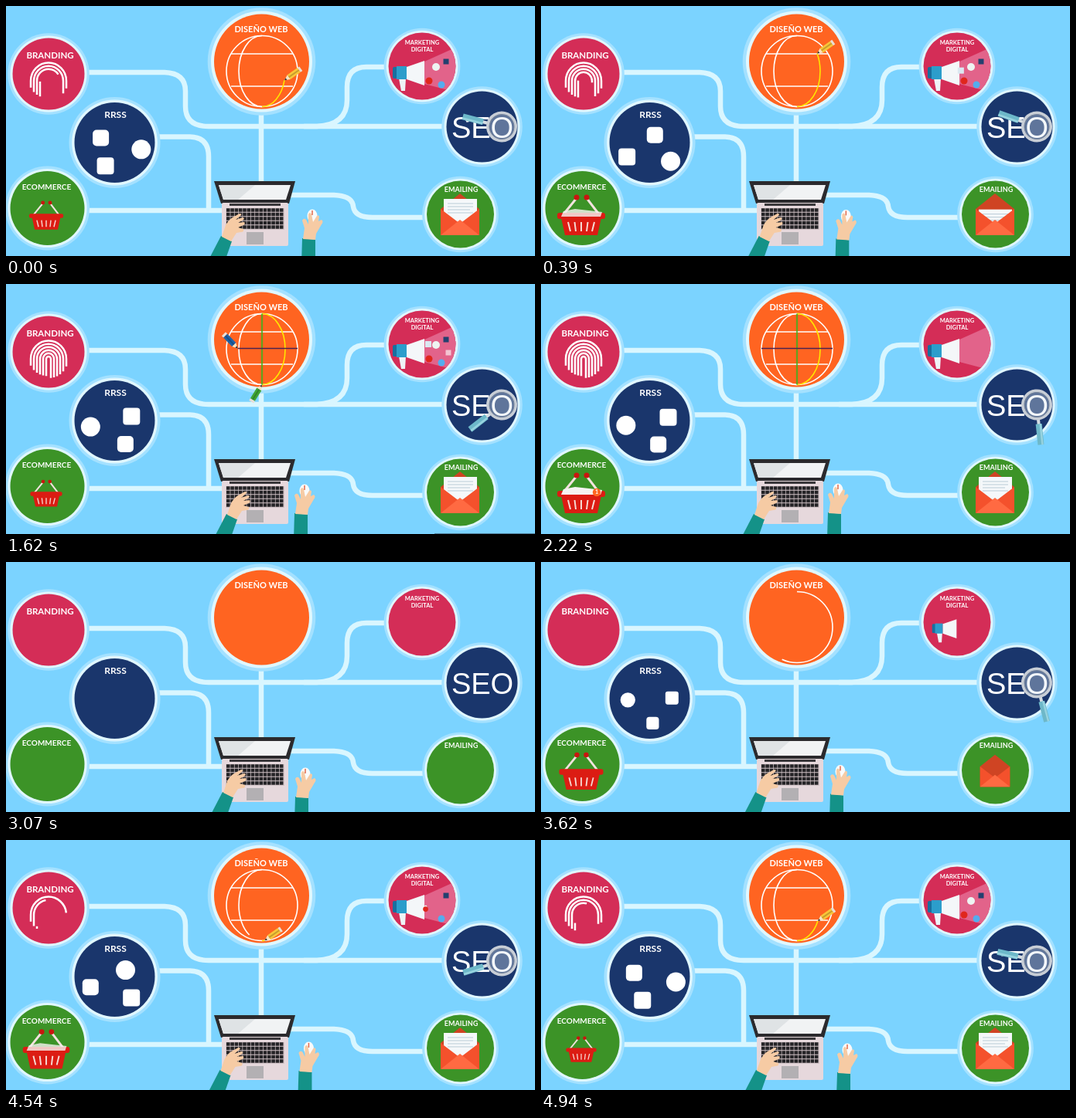
These frames come from a looping animation (684x324 px, 5040 ms). An HTML page:

```html
<!DOCTYPE html>
<html lang="es">
<head>
<meta charset="utf-8">
<style>
html, body { margin: 0; width: 100%; height: 100%; overflow: hidden; background: #7bd3ff }
svg { display: block; width: 684px; height: 324px }
.label { font: 700 11px Lato, "Open Sans", sans-serif; fill: #fff; text-anchor: middle }
.wire { fill: none; stroke: #d9f6ff; stroke-width: 6.5 }
.line { fill: none; stroke: #fff; stroke-width: 1.6 }
</style>
</head>
<body>
<svg viewBox="0 0 684 324">
  <defs>
    <clipPath id="beamClip"><circle cx="538" cy="78" r="43.5"/></clipPath>
    <clipPath id="mailClip"><rect x="550" y="225" width="75" height="71"/></clipPath>
  </defs>

  <g class="wire">
    <path d="M330 134V230M104 86H205Q232 87 232 110V130Q232 156 262 156H568"/>
    <path d="M385 156H402Q441 154 441 122V105Q441 79 466 79H492"/>
    <path d="M196 169.500H238Q262 170 262 195V265M103 265H282"/>
    <path d="M368 245H424Q448 246 449 260Q451 274 474 274H542"/>
  </g>
  <g id="discs"></g>

  <g class="label">
    <text x="57" y="68" style="font-size:11.500px">BRANDING</text>
    <text x="330" y="34">DISEÑO WEB</text>
    <text x="141.500" y="145" style="font-size:12px">RRSS</text>
    <text x="52.500" y="238" style="font-size:10px">ECOMMERCE</text>
    <text x="588.500" y="241" style="font-size:9px">EMAILING</text>
    <text x="538" y="50" style="font-size:7.500px">MARKETING</text>
    <text x="538" y="59" style="font-size:7.500px">DIGITAL</text>
    <text x="616" y="170.500" style="font:38px 'Liberation Sans',Arial,sans-serif">SEO</text>
  </g>

  <g id="print" class="line" style="stroke-width:2.500"></g>

  <g id="globe" class="line">
    <circle id="rim" cx="331" cy="84.500" r="46" pathLength="1" transform="rotate(-90 331 84.500)"/>
    <path id="upper" pathLength="1" d="M291 62H371"/>
    <path id="lower" pathLength="1" d="M291 104H371"/>
    <path id="west" pathLength="1" d="M331 38.500A30 46 0 0 0 331 130.500"/>
  </g>
  <g id="pens"></g>

  <g id="social" fill="#fff">
    <circle r="12.500"/>
    <rect x="-11" y="-11" width="22" height="22" rx="4"/>
    <rect x="-10.500" y="-10.500" width="21" height="21" rx="5"/>
  </g>

  <g id="basket">
    <path d="M-23 -2L-6 -23M23 -2L7 -23" stroke="#f3e3de" stroke-width="3"/>
    <circle cx="-6" cy="-24" r="3.500" fill="#c9160f"/>
    <circle cx="7" cy="-24" r="3.500" fill="#c9160f"/>
    <path d="M-26 2H26L21 25H-21Z" fill="#dc1c13"/>
    <path d="M-17 8L-14 20M-8.500 8L-7 20M0 8V20M8.500 8L7 20M17 8L14 20" stroke="#f6d9d3" stroke-width="2"/>
    <rect x="-31" y="-4" width="62" height="8" rx="3" fill="#dc1c13"/>
    <path id="goods" d="M-26 1L-23 -6L-8 -9L10 -7L27 -5L25 1Z" fill="#f6f3f1"/>
    <g id="badge">
      <circle r="9.500" fill="#ff6421"/>
      <text class="label" y="4.500" style="font-size:13px">1</text>
    </g>
  </g>

  <g id="horn">
    <path id="beam" clip-path="url(#beamClip)" d="M541 72L583 53V112L541 101Z" fill="#e2638a"/>
    <path d="M508 94H517L516 110H511Z" fill="#eef3f6"/>
    <rect x="500" y="79" width="6" height="15" rx="2" fill="#196f9f"/>
    <rect x="505" y="78" width="13" height="17" fill="#2c9dcb"/>
    <path d="M518 79L541 71V103L518 95Z" fill="#f4f7f9"/>
  </g>
  <g id="chips"></g>

  <g id="mail">
    <path d="M562 263L587 243L612 263V297H562Z" fill="#cf4423"/>
    <g clip-path="url(#mailClip)"><g id="letter">
      <rect x="566" y="250" width="43" height="48" fill="#f5f8fa"/>
      <path d="M571 256H604M571 260H604M571 264H600M571 268H604" stroke="#b9cbd6"/>
    </g></g>
    <path d="M562 263L587 282L612 263V297H562Z" fill="#f4512c"/>
    <path d="M562 297L587 277L612 297Z" fill="#ff6a42"/>
  </g>

  <g id="lens">
    <path d="M18 0H27" stroke="#d5dde2" stroke-width="4"/>
    <path d="M25 0H52" stroke="#6db8c9" stroke-width="8"/>
    <path d="M25 -2H52" stroke="#97d3df" stroke-width="2.500"/>
    <circle r="18" fill="#dfeaf2" fill-opacity=".35" stroke="#c8ced6" stroke-width="4"/>
    <circle r="16" fill="none" stroke="#75849b" stroke-width="1"/>
  </g>

  <g id="laptop">
    <path d="M269 227H374L366 256H278Z" fill="#2b2a2d"/>
    <path d="M275 232H368L362 251H281Z" fill="#f1f3f4"/>
    <path d="M275 232H322L300 251H281Z" fill="#dfe3e5"/>
    <rect x="279" y="255" width="86" height="56" rx="2" fill="#e6d8dc"/>
    <rect x="289" y="256" width="66" height="3" fill="#3a383b"/>
    <rect x="284" y="262" width="76" height="28" fill="#d2c4c8"/>
    <path d="M285 264.500H359M285 270H359M285 275.500H359M285 281H359M285 286.500H359" stroke="#242326" stroke-width="4.300" stroke-dasharray="4.600 .7"/>
    <rect x="311" y="293" width="22" height="16" fill="#b3b0b3"/>
  </g>
  <g id="left">
    <path d="M264 325L278 298L292 305L285 325Z" fill="#149288"/>
    <path d="M279 299L284 284Q288 277 293 274L302 269Q306 269 303 272L297 277L306 274Q309 275 307 277L300 281L308 280Q310 282 307 284L300 287L307 289Q308 293 304 293L298 294L291 305Z" fill="#f6cba4"/>
  </g>
  <g id="right">
    <path d="M383 301L400 303V335H382Z" fill="#149288"/>
    <ellipse cx="396" cy="272" rx="6.500" ry="8.500" fill="#fafafa"/>
    <path d="M384 302L386 288L383 278Q385 274 388 277L391 283L391 270Q393 266 395 270L397 280L402 272Q404 270 405 273L404 279L408 277Q411 279 408 283L401 295L400 303Z" fill="#f6cba4"/>
    <path d="M396 265V271" stroke="#e2694a" stroke-width="1.500"/>
  </g>
  <rect id="strip" x="554" y="323" width="130" height="1" fill="#4f7f9d"/>
</svg>

<script>
const LOOP = 5040, START = 2810;
const holds = [130, 130, 130, 150, 140, 130, 130, 160, 140, 120, 140, 120, 150, 140, 160, 150, 170, 140,
  130, 150, 130, 130, 130, 140, 130, 150, 120, 140, 140, 130, 120, 130, 140, 130, 150, 120, 100];
const $ = id => document.getElementById(id);
const move = (el, x, y, s = 1, a = 0) =>
  el.setAttribute('transform', `translate(${x} ${y}) rotate(${a}) scale(${s})`);
const zoom = (el, x, y, s) =>
  el.setAttribute('transform', `translate(${x} ${y}) scale(${s}) translate(${-x} ${-y})`);
const draw = (el, p) => el.setAttribute('stroke-dasharray', `${p} 2`);

function add(parent, tag, attrs) {
  const el = document.createElementNS('http://www.w3.org/2000/svg', tag);
  for (const k in attrs) el.setAttribute(k, attrs[k]);
  return parent.appendChild(el);
}

// Linear interpolation through time, value pairs
function at(t, ...k) {
  if (t <= k[0]) return k[1];
  for (let i = 2; i < k.length; i += 2)
    if (t <= k[i]) return k[i - 1] + (k[i + 1] - k[i - 1]) * (t - k[i - 2]) / (k[i] - k[i - 2]);
  return k[k.length - 1];
}

for (const [cx, cy, r, fill] of [
  [55, 88, 46.5, '#d42d57'], [330.5, 72, 61.5, '#ff6421'], [140.5, 177, 52, '#1a366c'],
  [53.5, 262, 48, '#3c9327'], [538, 78, 43.5, '#d42d57'], [615.5, 156.5, 46, '#1a366c'],
  [587.5, 270, 43.5, '#3c9327']]) {
  add($('discs'), 'circle', { cx, cy, r: r * 1.135, fill: '#a4e1ff' });
  add($('discs'), 'circle', { cx, cy, r: r * 1.065, fill: '#e0f7ff' });
  add($('discs'), 'circle', { cx, cy, r, fill });
}

// Fingerprint ridges, outermost first
const ridges = [23, 19, 15, 11, 7, 3].map(r => {
  const leg = Math.sqrt(625 - r * r);
  return add($('print'), 'path', {
    pathLength: 1,
    d: `M${55 - r} ${97 + leg * .9}V97A${r} ${r * 1.02} 0 0 1 ${55 + r} 97V${97 + leg}`
  });
});

const pens = [
  ['M331 130.500A30 46 0 0 0 331 38.500', '#ffe600', '#f8c63a', -35, 4500, 5840, 5860],
  ['M331 38.500V130.500', '#35b51d', '#3fa535', 122, 5820, 6640, 6760],
  ['M377 83.500H285', '#4a2350', '#1e63a8', 226, 5700, 6840, 6860]
].map(([d, ink, body, angle, from, to, hide]) => {
  const line = add($('globe'), 'path', { d, pathLength: 1, style: `stroke:${ink}` });
  const pen = add($('pens'), 'g', {});
  add(pen, 'path', { d: 'M0 0L7 -3.500V3.500Z', fill: '#f7e3c0' });
  add(pen, 'path', { d: 'M0 0L3 -1.500V1.500Z', fill: '#333' });
  add(pen, 'path', { d: 'M7 -3.500H23V3.500H7Z', fill: body });
  add(pen, 'path', { d: 'M7 0H23', stroke: '#0003', 'stroke-width': 2 });
  add(pen, 'path', { d: 'M23 -3.500H26V3.500H23Z', fill: '#e9dfd6' });
  return { line, pen, angle, from, to, hide, size: line.getTotalLength() };
});

const chips = [
  [569, 72, 7, 0, '#24406f', 3850], [563, 102, 9, 5, '#55acee', 4000],
  [556, 79, 10, 5, '#eef4f2', 4500], [547, 97, 9, 5, '#e0261c', 4450],
  [546, 78, 8, 0, '#dbe8f1', 5300], [572, 89, 7, 0, '#f3c4d2', 5500]
].map(([x, y, w, rx, fill, from]) => ({
  x, y, from, el: add($('chips'), 'rect', { x: -w / 2, y: -w / 2, width: w, height: w, rx, fill })
}));

function render(t) {
  const u = t < START ? t + LOOP : t;
  const leave = at(u, 7480, 1, 7800, 0);
  const enter = from => at(u, from, 0, from + 350, 1) * leave;

  ridges.forEach((r, i) => draw(r, at(u, 3850 + i * 330, 0, 4650 + i * 330, 1)));
  $('print').setAttribute('opacity', leave);

  draw($('rim'), at(u, 3250, 0, 3900, 1));
  draw($('upper'), at(u, 3700, 0, 4050, 1));
  draw($('lower'), at(u, 3750, 0, 4100, 1));
  draw($('west'), at(u, 3930, 0, 4650, 1));
  $('globe').setAttribute('opacity', leave);
  for (const p of pens) {
    const done = at(u, p.from, 0, p.to, 1), tip = p.line.getPointAtLength(done * p.size);
    draw(p.line, done);
    move(p.pen, tip.x, tip.y, u > p.from && u < p.hide ? 1 : 0, p.angle);
  }

  const turn = at(u, 3350, 190, 4150, 237, 4940, 349, 5040, 354, 5980, 463, 6660, 548, 7260, 553, 7800, 570);
  [...$('social').children].forEach((el, i) => {
    const a = (turn + i * 120) * Math.PI / 180;
    move(el, 142 + 33 * Math.cos(a), 188 + 21 * Math.sin(a), enter(3350));
  });

  // Basket swells three times per loop
  const p = (u - 3220 + LOOP) % 1680;
  const badge = at(p, 560, 0, 780, 1, 1200, 1, 1320, 0);
  move($('basket'), 52, 272, at(p, 0, .6, 500, 1, 1300, 1, 1640, .6) * enter(3220));
  move($('badge'), 20, -2, badge);
  $('goods').setAttribute('opacity', at(p, 400, 0, 560, 1, 1300, 1, 1400, 0));

  zoom($('horn'), 525, 85, enter(3350));
  $('beam').setAttribute('opacity', at(u, 3700, 0, 3900, 1));
  for (const c of chips) {
    const k = at(u, c.from, 0, c.from + 350, 1);
    move(c.el, 541 + (c.x - 541) * k, 87 + (c.y - 87) * k, at(u, c.from, 0, c.from + 120, 1, 6950, 1, 7230, 0));
  }

  zoom($('mail'), 587, 272, enter(3350));
  move($('letter'), 0, 36 * (1 - at(u, 3850, 0, 4450, 1, 5240, 1, 5740, 0, 6140, 0, 6580, 1)));

  move($('lens'), 641, 156.5, at(u, 3250, 0, 3450, 1, 7450, 1, 7750, 0),
    at(u, 3340, 45, 4150, 133, 4940, 193, 5400, 200, 5980, 193, 6660, 142, 7260, 84, 7700, 42));

  move($('left'), at(u, 2810, 0, 3070, 2, 4150, -3, 4940, 0, 5040, 0, 5980, 9, 6660, 7, 7260, -3, 7850, 0), 0);
  move($('right'),
    at(u, 2810, -10, 3070, -9, 4150, -9, 4940, 0, 5040, 0, 5980, -4, 6660, -10, 7260, -12, 7850, -10),
    at(u, 2810, 1, 3070, 3, 4150, -4, 4940, 0, 5040, 0, 5980, 1, 6660, -4, 7260, -5, 7850, 1));
  $('strip').setAttribute('opacity', t >= 1240 && t < 2220 ? 1 : 0);
}

// The picture holds still between steps
function step(now) {
  let t = 0, i = 0;
  while (i < holds.length - 1 && t + holds[i] <= now) t += holds[i++];
  return t;
}

const begin = performance.now();
function tick() {
  render(step((performance.now() - begin) % LOOP));
  requestAnimationFrame(tick);
}
tick();
</script>
</body>
</html>
```
